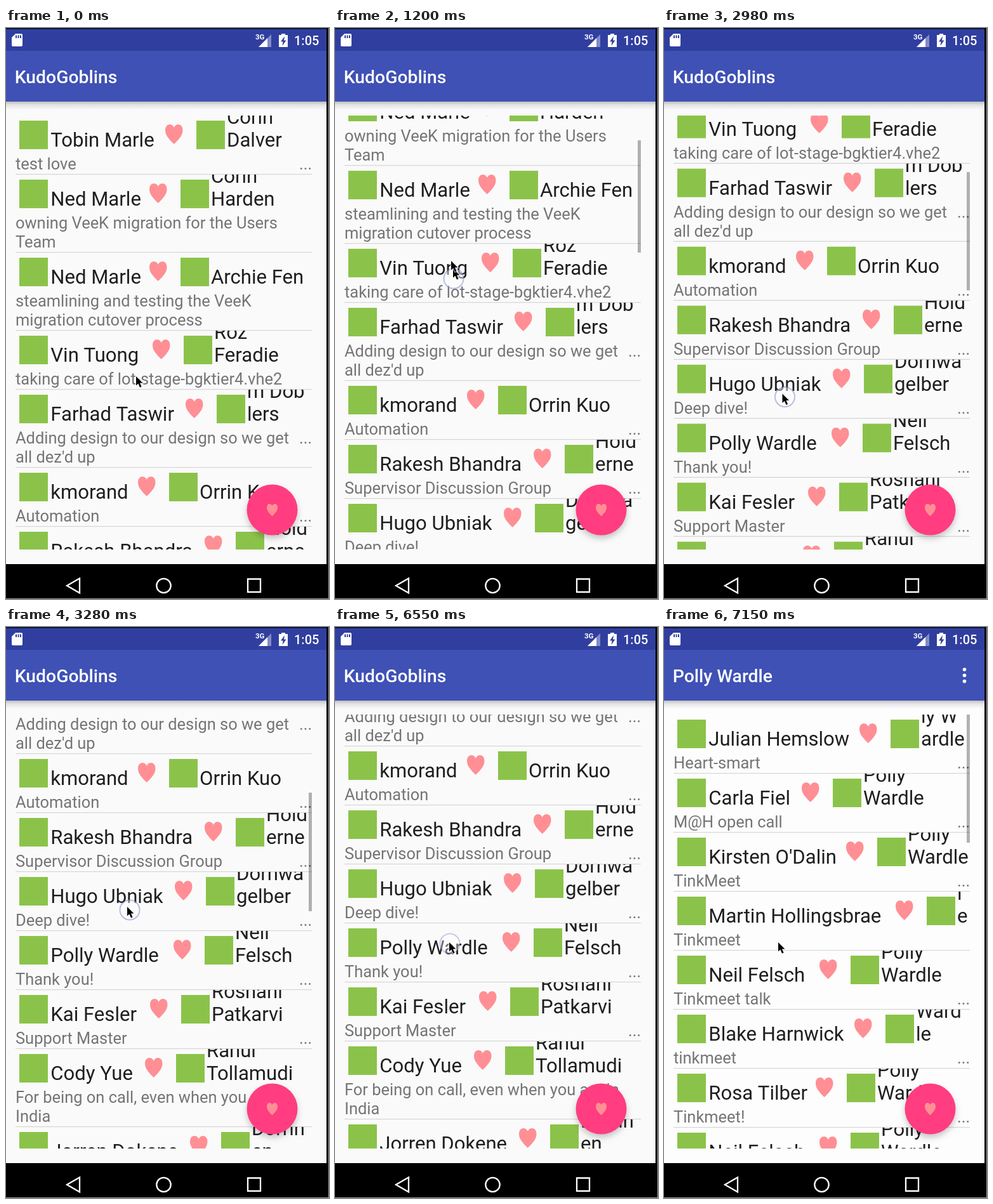
Animation, 509 px wide and 900 px high, one loop 8000 ms. Source, as an HTML page with a canvas:

```html
<!DOCTYPE html>
<html lang="en">
<head>
<meta charset="utf-8">
<title>KudoGoblins</title>
<style>
html, body { margin: 0; width: 100%; height: 100%; overflow: hidden; background: #000; }
canvas { display: block; }
</style>
</head>
<body>
<canvas id="stage" width="509" height="900"></canvas>
<script>
const ctx = document.getElementById('stage').getContext('2d');
const LOOP = 8000, STEP = 148.6;
const LIST = { x: 15, y: 138, w: 467, h: 684 };
const FONT = 'Roboto, Arial, sans-serif';
const NAME_SIZE = 31.1, BODY_SIZE = 25.45;

// heart x, sender, recipient lines (upper, lower), message lines, more dots
const feed = [
  [251, 'Tobin Marle', 'Corin', 'Dalver', ['test love'], 1],
  [226, 'Ned Marle', 'Corin', 'Harden', ['owning VeeK migration for the Users', 'Team'], 0],
  [226, 'Ned Marle', '', 'Archie Fen', ['steamlining and testing the VeeK', 'migration cutover process'], 0],
  [231, 'Vin Tuong', 'Roz', 'Feradie', ['taking care of lot-stage-bgktier4.vhe2'], 0],
  [283, 'Farhad Taswir', 'm Dob', 'lers', ['Adding design to our design so we get', "all dez'd up"], 1],
  [208, 'kmorand', '', 'Orrin Kuo', ['Automation'], 1],
  [313, 'Rakesh Bhandra', 'Hold', 'erne', ['Supervisor Discussion Group'], 1],
  [266, 'Hugo Ubniak', 'Dornwa', 'gelber', ['Deep dive!'], 1],
  [264, 'Polly Wardle', 'Neil', 'Felsch', ['Thank you!'], 1],
  [227, 'Kai Fesler', 'Roshani', 'Patkarvi', ['Support Master'], 1],
  [219, 'Cody Yue', 'Rahul', 'Tollamudi', ['For being on call, even when you are in', 'India'], 0],
  [290, 'Jorren Dokene', 'Dorrin', 'en', [''], 0]
];
const profile = [
  [308, 'Julian Hemslow', 'ly W', 'ardle', ['Heart-smart'], 1],
  [217, 'Carla Fiel', 'Polly', 'Wardle', ['M@H open call'], 1],
  [287, "Kirsten O'Dalin", 'Polly', 'Wardle', ['TinkMeet'], 1],
  [365, 'Martin Hollingsbrae', 'l', 'e', ['Tinkmeet'], 0],
  [245, 'Neil Felsch', 'Polly', 'Wardle', ['Tinkmeet talk'], 1],
  [300, 'Blake Harnwick', 'Ward', 'le', ['tinkmeet'], 1],
  [239, 'Rosa Tilber', 'Polly', 'Wardle', ['Tinkmeet!'], 1],
  [245, 'Neil Felsch', 'Polly', 'Wardle', [''], 0]
];

// Tracks: step (or offset) followed by values
const scrollTrack = [[6, 0], [7, 62], [8, 137], [9, 190], [10, 217], [11, 231], [12, 237], [13, 239],
  [18, 239], [19, 288], [22, 493], [23, 501], [25, 505]];
const cursorTrack = [[6, 205, 549], [7, 194, 468], [8, 183, 367], [9, 180, 340], [11, 184, 400],
  [14, 199, 668], [16, 180, 714], [18, 182, 712], [22, 191, 441], [25, 192, 441], [26, 197, 500],
  [28, 230, 688], [30, 230, 688], [31, 230, 666], [34, 229, 501], [35, 229, 501], [39, 180, 497]];
const barTrack = [[0, 0, 170], [137, 39, 177], [239, 60, 186], [505, 126, 187]];
const barFade = { 14: .12, 15: .04, 26: .4, 27: .1 };
const blurred = [8, 14, 31];
const within = (k, a, b) => k >= a && k <= b;

function sample(track, x) {
  const i = track.findIndex(p => p[0] > x);
  if (i < 0) return track[track.length - 1].slice(1);
  if (i === 0) return track[0].slice(1);
  const a = track[i - 1], b = track[i], u = (x - a[0]) / (b[0] - a[0]);
  return a.slice(1).map((v, j) => v + (b[j + 1] - v) * u);
}

function rect(x, y, w, h, color) {
  ctx.fillStyle = color;
  ctx.fillRect(x, y, w, h);
}

function text(str, x, y, size, color, weight = 400) {
  ctx.font = `${weight} ${size}px ${FONT}`;
  ctx.fillStyle = color;
  ctx.fillText(str, x, y);
}

const nameText = (str, x, y) => text(str, x, y, NAME_SIZE, '#1f1f1f');
const bodyText = (str, x, y) => text(str, x, y, BODY_SIZE, '#757575');

function disc(x, y, r, color) {
  ctx.fillStyle = color;
  ctx.beginPath();
  ctx.arc(x, y, r, 0, 7);
  ctx.fill();
}

function fillPath(d, color) {
  ctx.fillStyle = color;
  ctx.fill(new Path2D(d));
}

function clipTo(x, y, w, h) {
  ctx.beginPath();
  ctx.rect(x, y, w, h);
  ctx.clip();
}

function heart(x, y, w, h) {
  ctx.save();
  ctx.translate(x, y);
  ctx.scale(w, h);
  fillPath('M.5 1C.15 .7 0 .52 0 .29C0 .1 .12 0 .27 0C.38 0 .46 .07 .5 .16' +
    'C.54 .07 .62 0 .73 0C.88 0 1 .1 1 .29C1 .52 .85 .7 .5 1', '#ff8f94');
  ctx.restore();
}

function drawRow([hx, from, upper, lower, lines, dots], y, h) {
  ctx.save();
  clipTo(LIST.x, y, LIST.w, h + .5);
  for (const x of [21, hx + 49]) rect(x, y + 8, 45, 45, '#8bc34a');
  heart(hx, y + 14, 27.5, 31);
  nameText(from, 70.3, y + 49);
  nameText(upper, hx + 97, y + 13);
  nameText(lower, hx + 97, y + 49);
  lines.forEach((line, i) => bodyText(line, 15, y + 85 + 30 * i));
  if (dots) bodyText('...', 462, y + 85);
  rect(LIST.x, y + h - 1, LIST.w, 1.4, '#d6d6d6');
  ctx.restore();
}

function drawList(rows, offset) {
  ctx.save();
  clipTo(LIST.x, LIST.y, LIST.w, LIST.h);
  let y = LIST.y - offset;
  for (const row of rows) {
    const h = 63 + 30 * row[4].length;
    if (y < LIST.y + LIST.h && y + h > LIST.y) drawRow(row, y, h);
    y += h;
  }
  ctx.restore();
}

function drawBar(top, length, alpha) {
  rect(477, LIST.y + top, 5, length, `rgba(0,0,0,${.3 * alpha})`);
}

function drawPage(title, background, rows, offset) {
  rect(0, 116, 505, 729, background);
  if (rows) drawList(rows, offset);
  const shade = ctx.createLinearGradient(0, 116, 0, 129);
  shade.addColorStop(0, 'rgba(0,0,0,.24)');
  shade.addColorStop(.4, 'rgba(0,0,0,.09)');
  shade.addColorStop(1, 'rgba(0,0,0,0)');
  rect(0, 116, 505, 13, shade);
  rect(0, 36, 505, 80, '#3f51b5');
  text(title, 13.8, 87, 28.3, '#fff', 500);
}

function drawFab() {
  ctx.save();
  ctx.shadowColor = 'rgba(0,0,0,.22)';
  ctx.shadowBlur = 10;
  ctx.shadowOffsetY = 5;
  disc(419.5, 759.5, 40, '#ff3d80');
  ctx.restore();
  heart(411, 750, 17, 19.5);
}

function drawSystemBars() {
  rect(0, 0, 509, 36, '#303f9f');
  rect(0, 0, 509, 2, '#10153a');
  fillPath('M15 9H24Q26 9 26 11V27Q26 29 24 29H11Q9 29 9 27V15Z', '#fff');
  for (const x of [15, 18.5, 22]) rect(x, 11.5, 2, 4.5, '#303f9f');
  text('3G', 393, 18, 11.5, '#fff', 700);
  fillPath('M418 10V30H398Z', 'rgba(255,255,255,.4)');
  fillPath('M412 16V30H398Z', '#fff');
  fillPath('M434 9H440V11H444V30H430V11H434Z', '#fff');
  fillPath('M439 13L433 21.5H436.5L435.5 28L441.5 19.5H438Z', '#303f9f');
  text('1:05', 454, 27, 20, '#fff', 500);

  rect(0, 845, 509, 55, '#000');
  ctx.strokeStyle = '#fff';
  ctx.lineWidth = 2.3;
  ctx.stroke(new Path2D('M96 879L116 867.5V890.5ZM381 868.5H401V889H381Z'));
  ctx.beginPath();
  ctx.arc(248.5, 879, 11.2, 0, 7);
  ctx.stroke();

  // Emulator window edge
  rect(505, 0, 4, 900, '#000');
  rect(508, 0, 1, 900, '#9a9a9a');
  rect(0, 899, 509, 1, '#9a9a9a');
}

function drawRing(x, y, alpha) {
  disc(x, y, 15.5, `rgba(255,255,255,${.45 * alpha})`);
  ctx.strokeStyle = `rgba(120,130,200,${.5 * alpha})`;
  ctx.lineWidth = 2;
  ctx.stroke();
}

function drawArrow(x, y) {
  ctx.save();
  ctx.translate(x, y);
  const arrow = new Path2D('M0 0V14.5L3.4 11.5L6 17.5L8.6 16.4L6 10.6H10.5Z');
  ctx.strokeStyle = '#fff';
  ctx.lineWidth = 1.6;
  ctx.stroke(arrow);
  ctx.fillStyle = '#000';
  ctx.fill(arrow);
  ctx.restore();
}

function drawPointer(k) {
  const [x, y] = sample(cursorTrack, k), blur = blurred.includes(k);
  if (within(k, 6, 9) || within(k, 18, 22)) drawRing(x + 4, y + (blur ? 28 : 5), 1);
  if (within(k, 42, 44)) drawRing(x + 1, y + 2, k === 44 ? .8 : 1);
  if (blur) drawArrow(x + 3, y + 12);
  drawArrow(x, y);
}

function draw(t) {
  const k = Math.max(0, Math.floor((t - 5) / STEP));
  ctx.clearRect(0, 0, 509, 900);
  if (k < 46) {
    const [offset] = sample(scrollTrack, k);
    drawPage('KudoGoblins', '#fafafa', feed, offset);
    const alpha = within(k, 7, 13) || within(k, 19, 25) ? 1 : barFade[k] || 0;
    drawBar(...sample(barTrack, offset), alpha);
    drawFab();
  }
  if (k >= 45) {
    ctx.save();
    if (k === 45) {
      ctx.globalAlpha = .6;
      ctx.translate(0, 20);
    }
    drawPage('Polly Wardle', '#fdfdfd', k >= 48 && profile, 0);
    for (const y of [67, 76.3, 85.6]) disc(473.5, y, 2.8, '#fff');
    if (k >= 48) drawBar(0, 202, 1);
    drawFab();
    ctx.restore();
  }
  drawSystemBars();
  drawPointer(k);
}

function tick() {
  draw(performance.now() % LOOP);
  requestAnimationFrame(tick);
}
tick();
</script>
</body>
</html>
```
